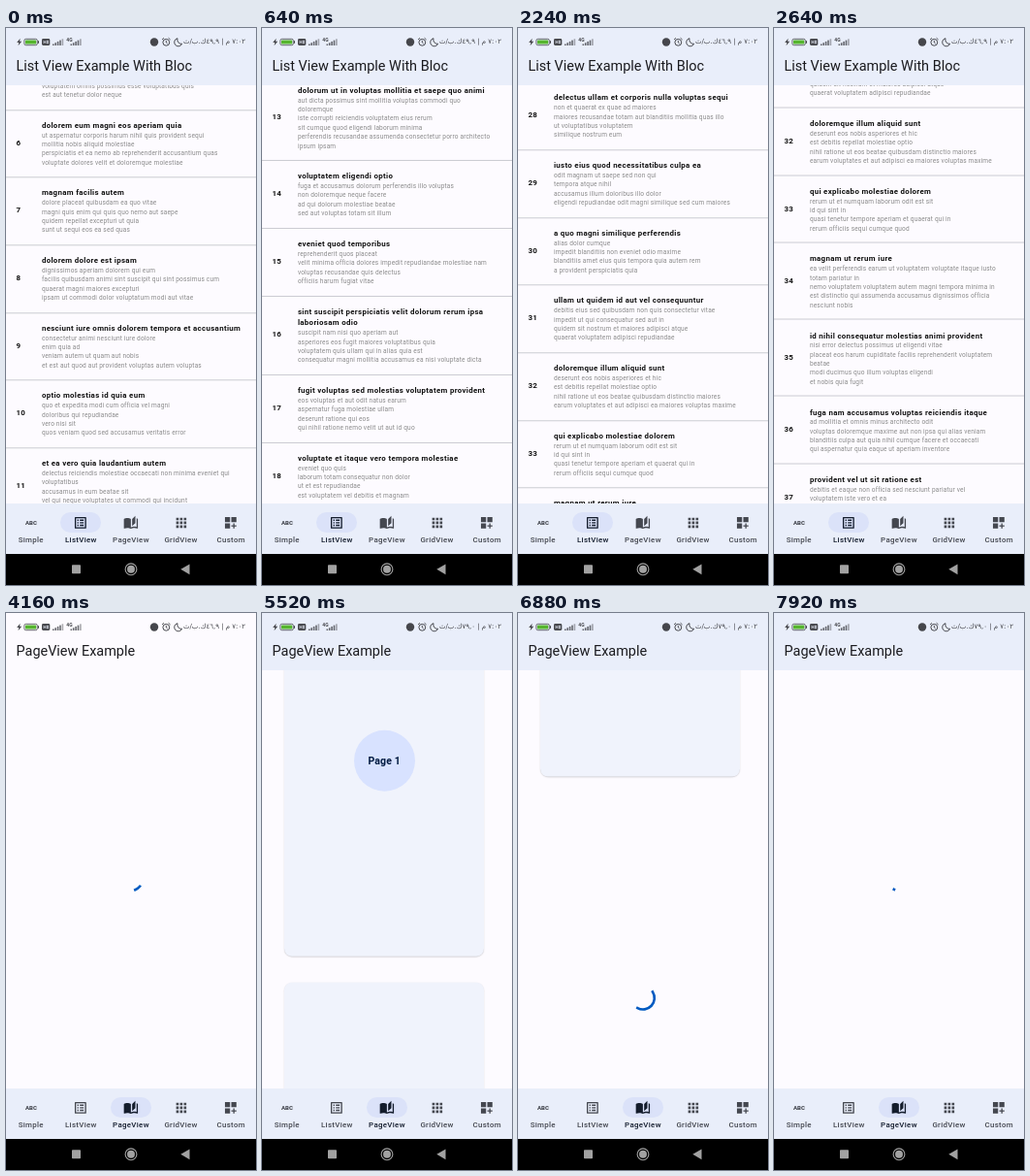
These frames come from a looping animation (258 px wide and 574 px high, 8000 ms). An HTML page:

```html
<!DOCTYPE html>
<html lang="en">
<head>
<meta charset="utf-8">
<title>List and page views</title>
<style>
html, body { margin: 0; width: 258px; height: 574px; overflow: hidden; background: #fdfbff; }
body { position: relative; font-family: Roboto, "Open Sans", sans-serif; color: #1b1b1f; }
div, svg { position: absolute; }
svg { overflow: visible; }
#bar { left: 0; top: 0; width: 258px; height: 59px; }
#title { left: 10.5px; top: 30px; font-size: 14.44px; line-height: 20px; white-space: nowrap; }
#speed { right: 11px; top: 9px; font: 7px/11px "DejaVu Sans", sans-serif; color: #45464b; white-space: nowrap; }
#view { left: 0; top: 59px; width: 258px; height: 430.5px; overflow: hidden; }
#list { left: 0; top: 0; width: 258px; }
.post { position: relative; padding: 11.1px 0 9.27px 36.9px; white-space: pre; }
.post::before { content: ""; position: absolute; left: 0; top: 0; width: 258px; height: 1px; background: #cbccd2; }
.post b, .post p { display: block; margin: 0; }
.post b, .id { font-size: 7.88px; line-height: 11.81px; letter-spacing: .328px; font-weight: 700; color: #111; }
.post p { font-size: 6.56px; line-height: 9.38px; letter-spacing: .164px; color: #8c8c8c; }
.id { left: 10.5px; top: 0; bottom: 0; display: flex; align-items: center; }
.card { left: 23px; width: 206.4px; height: 404.3px; border-radius: 7.9px; background: #f0f3fc; box-shadow: 0 .7px 1.4px #0003; }
.card div { left: 71.7px; top: 170.6px; width: 63px; height: 63px; border-radius: 50%; background: #d8e2ff;
  color: #001a41; font-size: 10.5px; font-weight: 700; line-height: 63px; letter-spacing: .1px; text-align: center; }
#spin { left: 0; top: 0; }
#nav { left: 0; top: 489.5px; width: 258px; height: 52.5px; background: #e9eefa; }
.tab { top: 0; width: 51.6px; height: 52.5px; color: #44474f; }
.tab.on { color: #131c2c; }
.pill { left: 4.8px; top: 9.5px; width: 42px; height: 21px; border-radius: 10.5px; background: #dbe2f9; }
.tab svg { left: 17.9px; top: 12.1px; }
.tab span { position: absolute; left: 0; right: 0; top: 32px; text-align: center; font-size: 7.88px;
  line-height: 12px; letter-spacing: .328px; font-weight: 500; }
#system { left: 0; top: 542px; width: 258px; height: 32px; background: #000; }
</style>
</head>
<body>
<div id="bar">
  <svg width="258" height="24" fill="#45464b">
    <path d="M14.6 10.8l-3.4 4.2h2.1l-.7 3.3 3.6-4.5h-2.1z"/>
    <rect x="18.9" y="11.3" width="13.4" height="6.4" rx="1.6" fill="none" stroke="#45464b" stroke-width=".8"/>
    <rect x="20" y="12.4" width="11.2" height="4.2" rx=".7" fill="#55b52e"/>
    <rect x="33" y="13.2" width="1" height="2.6"/>
    <rect x="37" y="11" width="8.3" height="7" rx="1.4"/>
    <path d="M39 12.8v3.4M41 12.8v3.4M39 14.5h2M42.5 13h1v3h-1z" stroke="#e9eefa" stroke-width=".6" fill="none"/>
    <g id="signal"></g>
    <text x="62.3" y="14" font-size="5" font-weight="700">4G</text>
    <circle cx="153" cy="14.5" r="4.2"/>
    <g fill="none" stroke="#45464b">
      <circle cx="165.3" cy="14.8" r="3.4"/>
      <path d="M165.3 12.8v2.2l1.4 1M161 12l2-1.8M169.6 12l-2-1.8" stroke-width=".9"/>
      <path d="M177 10.7a4.1 4.1 0 1 0 4.6 5.6a4.3 4.3 0 0 1-4.6-5.6z"/>
    </g>
  </svg>
  <div id="speed" dir="rtl"></div>
  <div id="title"></div>
</div>
<div id="view">
  <div id="list"></div>
  <div id="pages"></div>
  <svg id="spin" width="258" height="431"><path fill="none" stroke="#005ac1" stroke-width="2.62" stroke-linecap="square"/></svg>
</div>
<div id="nav"></div>
<div id="system">
  <svg width="258" height="32" fill="#a2a2a2">
    <rect x="68" y="11.3" width="9" height="9" rx=".8"/>
    <circle cx="129" cy="15.8" r="4"/>
    <circle cx="129" cy="15.8" r="5.9" fill="none" stroke="#a2a2a2" stroke-width="1.1"/>
    <path d="M180.3 15.8l9.2-5.4v10.8z"/>
  </svg>
</div>
<script>
// One post per paragraph: title first ("|" breaks it), then the body lines.
const FIRST_ID = 5;
const POSTS = `nesciunt quas odio
repudiandae veniam quaerat sunt sed
alias aut fugiat sit autem sed est
voluptatem omnis possimus esse voluptatibus quis
est aut tenetur dolor neque

dolorem eum magni eos aperiam quia
ut aspernatur corporis harum nihil quis provident sequi
mollitia nobis aliquid molestiae
perspiciatis et ea nemo ab reprehenderit accusantium quas
voluptate dolores velit et doloremque molestiae

magnam facilis autem
dolore placeat quibusdam ea quo vitae
magni quis enim qui quis quo nemo aut saepe
quidem repellat excepturi ut quia
sunt ut sequi eos ea sed quas

dolorem dolore est ipsam
dignissimos aperiam dolorem qui eum
facilis quibusdam animi sint suscipit qui sint possimus cum
quaerat magni maiores excepturi
ipsam ut commodi dolor voluptatum modi aut vitae

nesciunt iure omnis dolorem tempora et accusantium
consectetur animi nesciunt iure dolore
enim quia ad
veniam autem ut quam aut nobis
et est aut quod aut provident voluptas autem voluptas

optio molestias id quia eum
quo et expedita modi cum officia vel magni
doloribus qui repudiandae
vero nisi sit
quos veniam quod sed accusamus veritatis error

et ea vero quia laudantium autem
delectus reiciendis molestiae occaecati non minima eveniet qui
voluptatibus
accusamus in eum beatae sit
vel qui neque voluptates ut commodi qui incidunt
ut animi commodi

in quibusdam tempore odit est dolorem
itaque id aut magnam
praesentium quia et ea odit et ea voluptas et
sapiente quia nihil amet occaecati quia id voluptatem
incidunt ea est distinctio odio

dolorum ut in voluptas mollitia et saepe quo animi
aut dicta possimus sint mollitia voluptas commodi quo
doloremque
iste corrupti reiciendis voluptatem eius rerum
sit cumque quod eligendi laborum minima
perferendis recusandae assumenda consectetur porro architecto
ipsum ipsam

voluptatem eligendi optio
fuga et accusamus dolorum perferendis illo voluptas
non doloremque neque facere
ad qui dolorum molestiae beatae
sed aut voluptas totam sit illum

eveniet quod temporibus
reprehenderit quos placeat
velit minima officia dolores impedit repudiandae molestiae nam
voluptas recusandae quis delectus
officiis harum fugiat vitae

sint suscipit perspiciatis velit dolorum rerum ipsa|laboriosam odio
suscipit nam nisi quo aperiam aut
asperiores eos fugit maiores voluptatibus quia
voluptatem quis ullam qui in alias quia est
consequatur magni mollitia accusamus ea nisi voluptate dicta

fugit voluptas sed molestias voluptatem provident
eos voluptas et aut odit natus earum
aspernatur fuga molestiae ullam
deserunt ratione qui eos
qui nihil ratione nemo velit ut aut id quo

voluptate et itaque vero tempora molestiae
eveniet quo quis
laborum totam consequatur non dolor
ut et est repudiandae
est voluptatem vel debitis et magnam

adipisci placeat illum aut reiciendis qui
illum quis cupiditate provident sit magnam
ea sed aut omnis
veniam maiores ullam consequatur atque
adipisci quo iste expedita sit quos voluptas

doloribus ad provident suscipit at
qui consequuntur ducimus possimus quisquam amet similique
suscipit porro ipsam amet
eos veritatis officiis exercitationem vel fugit aut necessitatibus
totam
omnis rerum consequatur expedita quidem cumque explicabo

asperiores ea ipsam voluptatibus modi minima quia|sint
repellat aliquid praesentium dolorem quo
sed totam minus non itaque
nihil labore molestiae sunt dolor eveniet hic recusandae veniam
tempora et tenetur expedita sunt

dolor sint quo a velit explicabo quia nam
eos qui et ipsum ipsam suscipit aut
sed omnis non odio
expedita earum mollitia molestiae aut atque rem suscipit
nam impedit esse

maxime id vitae nihil numquam
veritatis unde neque eligendi
quae quod architecto quo neque vitae
est illo sit tempora doloremque fugit quod
et et vel beatae sequi ullam sed tenetur perspiciatis

autem hic labore sunt dolores incidunt
enim et ex nulla
omnis voluptas quia qui
voluptatem consequatur numquam aliquam sunt
totam recusandae id dignissimos aut sed asperiores deserunt

rem alias distinctio quo quis
ullam consequatur ut
omnis quis sit vel consequuntur
ipsa eligendi ipsum molestiae et omnis error nostrum
molestiae illo tempore quia et distinctio

est et quae odit qui non
similique esse doloribus nihil accusamus
omnis dolorem fuga consequuntur reprehenderit fugit recusandae
temporibus
perspiciatis cum ut laudantium
omnis aut molestiae vel vero

quasi id et eos tenetur aut quo autem
eum sed dolores ipsam sint possimus debitis occaecati
debitis qui qui et
ut placeat enim earum aut odit facilis
consequatur suscipit necessitatibus rerum sed inventore
temporibus consequatur

delectus ullam et corporis nulla voluptas sequi
non et quaerat ex quae ad maiores
maiores recusandae totam aut blanditiis mollitia quas illo
ut voluptatibus voluptatem
similique nostrum eum

iusto eius quod necessitatibus culpa ea
odit magnam ut saepe sed non qui
tempora atque nihil
accusamus illum doloribus illo dolor
eligendi repudiandae odit magni similique sed cum maiores

a quo magni similique perferendis
alias dolor cumque
impedit blanditiis non eveniet odio maxime
blanditiis amet eius quis tempora quia autem rem
a provident perspiciatis quia

ullam ut quidem id aut vel consequuntur
debitis eius sed quibusdam non quis consectetur vitae
impedit ut qui consequatur sed aut in
quidem sit nostrum et maiores adipisci atque
quaerat voluptatem adipisci repudiandae

doloremque illum aliquid sunt
deserunt eos nobis asperiores et hic
est debitis repellat molestiae optio
nihil ratione ut eos beatae quibusdam distinctio maiores
earum voluptates et aut adipisci ea maiores voluptas maxime

qui explicabo molestiae dolorem
rerum ut et numquam laborum odit est sit
id qui sint in
quasi tenetur tempore aperiam et quaerat qui in
rerum officiis sequi cumque quod

magnam ut rerum iure
ea velit perferendis earum ut voluptatem voluptate itaque iusto
totam pariatur in
nemo voluptatem voluptatem autem magni tempora minima in
est distinctio qui assumenda accusamus dignissimos officia
nesciunt nobis

id nihil consequatur molestias animi provident
nisi error delectus possimus ut eligendi vitae
placeat eos harum cupiditate facilis reprehenderit voluptatem
beatae
modi ducimus quo illum voluptas eligendi
et nobis quia fugit

fuga nam accusamus voluptas reiciendis itaque
ad mollitia et omnis minus architecto odit
voluptas doloremque maxime aut non ipsa qui alias veniam
blanditiis culpa aut quia nihil cumque facere et occaecati
qui aspernatur quia eaque ut aperiam inventore

provident vel ut sit ratione est
debitis et eaque non officia sed nesciunt pariatur vel
voluptatem iste vero et ea
numquam aut expedita ipsum nulla in
voluptates omnis consequatur aut enim officiis in quam qui

explicabo et eos deleniti nostrum ab id repellendus
animi esse sit aut sit nesciunt assumenda eum voluptas
quia voluptatibus provident quia necessitatibus ea
rerum repudiandae quia voluptatem delectus fugit aut id quia
ratione optio eos iusto veniam iure`;

const LOOP = 8000, STEP = 80;
const PAGE_H = 430.5, PAGE_COUNT = 4;
const TAP = 3060, LOAD = 3078, READY = 5200, SWIPE = 5480, LOAD_MORE = 6630;
const SURFACE = "#fdfbff", TINT = "#e9eefa";

// Each move: start, end, from, to; it slows down towards the end.
const FLINGS = [[120, 900, 0, 600], [900, 1720, 600, 1110], [1780, 2960, 1110, 1956]];
const SWIPES = [[SWIPE, 5740, 0, 1], [5750, 6030, 1, 2], [6040, 6452, 2, 3], [6600, 7200, 3, 4]];
const SPEEDS = [[4800, "٧٩,٠"], [1200, "٤٦,٩"], [0, "٤٩,٩"]];

const gridPath = [4, 10, 16].flatMap(y => [4, 10, 16].map(x => `M${x} ${y}h4v4h-4z`)).join("");
const TABS = [
  ["Simple", null],
  ["ListView", "M19 5v14H5V5h14m1.1-2H3.9c-.5 0-.9.4-.9.9v16.2c0 .4.4.9.9.9h16.2c.4 0 .9-.5.9-.9V3.9c0-.5-.5-.9-.9-.9zM11 7h6v2h-6zm0 4h6v2h-6zm0 4h6v2h-6zM7 7h2v2H7zm0 4h2v2H7zm0 4h2v2H7z"],
  ["PageView", "M19 1l-5 5v11l5-4.5zM1 6v14.6c0 .5.4.6.8.5C3.1 20.4 5 20 6.5 20c2 0 4 .4 5.5 1.5V6c-1.5-1.1-3.5-1.5-5.5-1.5S2.5 4.9 1 6zm22 13.5V6c-.6-.5-1.3-.8-2-1v13.5c-1.1-.4-2.3-.5-3.5-.5-1.7 0-4.2.6-5.5 1.5v2c1.3-.9 3.8-1.5 5.5-1.5s3.3.3 4.7 1c.4.2.8 0 .8-.4z"],
  ["GridView", gridPath],
  ["Custom", "M3 3h8v8H3zM13 3h8v8h-8zM3 13h8v8H3zM16 13h2v3h3v2h-3v3h-2v-3h-3v-2h3z"]
];

const $ = id => document.getElementById(id);
const clamp = x => Math.min(1, Math.max(0, x));

$("list").innerHTML = POSTS.split("\n\n").map((post, i) => {
  const [title, ...lines] = post.split("\n");
  return `<div class="post"><div class="id">${FIRST_ID + i}</div><b>${title.replace("|", "\n")}</b><p>${lines.join("\n")}</p></div>`;
}).join("");

$("pages").innerHTML = Array.from({ length: PAGE_COUNT }, (_, i) =>
  `<div class="card" style="top:${i * PAGE_H + 13}px"><div>Page ${i + 1}</div></div>`).join("");

$("nav").innerHTML = TABS.map(([name, path], i) => {
  const icon = path ? `<path fill-rule="evenodd" d="${path}"/>`
    : `<text x="12" y="15.4" text-anchor="middle" font-size="9.2" font-weight="900">ABC</text>`;
  return `<div class="tab" style="left:${i * 51.6}px"><div class="pill"></div>
    <svg width="15.75" height="15.75" viewBox="0 0 24 24" fill="currentColor">${icon}</svg><span>${name}</span></div>`;
}).join("");

$("signal").innerHTML = [48, 66.5].map(x => [0, 1, 2, 3, 4].map(i =>
  `<rect x="${x + i * 2.4}" y="${16.5 - i * 1.3}" width="1.6" height="${1.5 + i * 1.3}" opacity="${i < 4 ? .8 : .45}"/>`).join("")).join("");

const tabs = [...document.querySelectorAll(".tab")];
const arc = document.querySelector("#spin path");

function follow(moves, t) {
  let value = 0;
  for (const [start, end, from, to] of moves) {
    if (t >= start) value = from + (to - from) * (1 - (1 - clamp((t - start) / (end - start))) ** 2);
  }
  return value;
}

// cubic-bezier(.4, 0, .2, 1)
function ease(x) {
  if (x <= 0 || x >= 1) return clamp(x);
  let lo = 0, hi = 1, u;
  for (let i = 0; i < 24; i++) {
    u = (lo + hi) / 2;
    if (1.2 * u * (1 - u) ** 2 + .6 * u * u * (1 - u) + u ** 3 < x) lo = u; else hi = u;
  }
  return 3 * u * u * (1 - u) + u ** 3;
}

function spinnerPath(age, cy) {
  const cycle = age / 1333 % 1, turn = age / 2222 % 1;
  const head = ease(cycle * 2), tail = ease(cycle * 2 - 1);
  const start = Math.PI * (-.5 + tail * 1.5 + turn * 2 + cycle * .5);
  const sweep = Math.max((head - tail) * 1.5 * Math.PI, .01);
  const r = 11.8;
  const at = a => `${(129 + r * Math.cos(a)).toFixed(3)} ${(cy + r * Math.sin(a)).toFixed(3)}`;
  return `M${at(start)}A${r} ${r} 0 ${+(sweep > Math.PI)} 1 ${at(start + sweep)}`;
}

function drawTabs(t) {
  const selected = t < TAP ? 1 : 2;
  const grow = t < TAP ? 1 : 1 - (1 - clamp((t - TAP) / 500)) ** 3;
  tabs.forEach((tab, i) => {
    const on = i === selected, leaving = i === 1 && !on;
    tab.classList.toggle("on", on);
    const pill = tab.firstChild.style;
    pill.opacity = on ? clamp(grow * 2) : leaving ? clamp(1 - (t - TAP) / 100) : 0;
    pill.transform = `scaleX(${on ? .4 + .6 * grow : 1})`;
  });
}

function draw(t) {
  const onList = t < LOAD, loading = !onList && t < READY, more = t >= LOAD_MORE;
  const page = follow(SWIPES, t);
  $("bar").style.background = onList || t > SWIPE ? TINT : SURFACE;
  $("title").textContent = onList ? "List View Example With Bloc" : "PageView Example";
  $("speed").textContent = `٧:٠٢ م | ${SPEEDS.find(([from]) => t >= from)[1]}ك.ب/ث`;
  $("list").style.display = onList ? "" : "none";
  $("list").style.transform = `translateY(${-44.7 - follow(FLINGS, t)}px)`;
  $("pages").style.display = t >= READY ? "" : "none";
  $("pages").style.transform = `translateY(${-page * PAGE_H}px)`;
  $("spin").style.display = loading || more ? "" : "none";
  if (loading) arc.setAttribute("d", spinnerPath(t - LOAD, PAGE_H / 2));
  if (more) arc.setAttribute("d", spinnerPath(t - LOAD_MORE, PAGE_H / 2 + (PAGE_COUNT - page) * PAGE_H));
  drawTabs(t);
}

function tick() {
  draw(Math.floor(performance.now() % LOOP / STEP) * STEP);
  requestAnimationFrame(tick);
}
tick();
</script>
</body>
</html>
```
